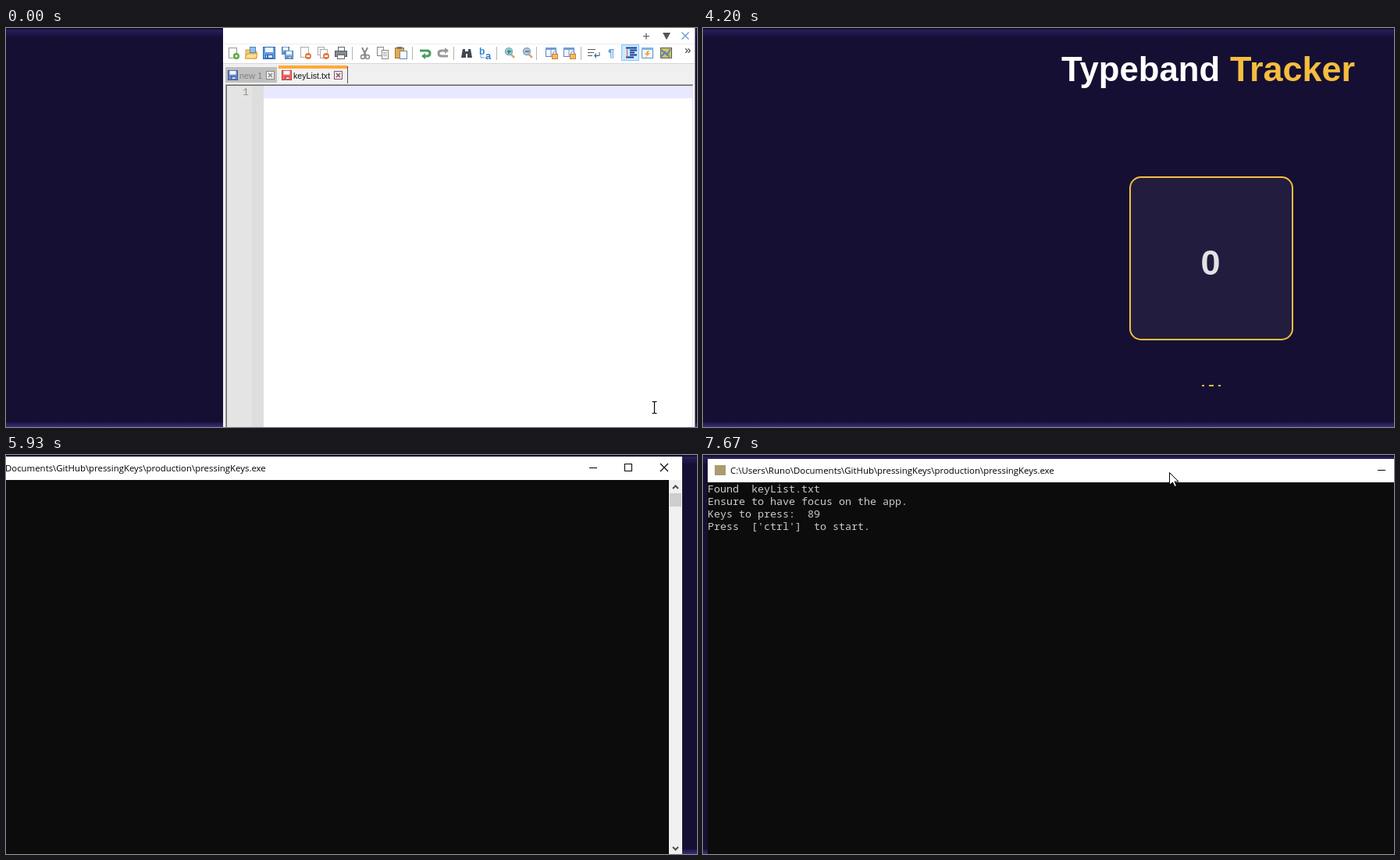
An HTML page with a canvas for the animation above (8 s loop, 885 by 511 pixels).

```html
<!DOCTYPE html>
<html lang="en">
<head>
<meta charset="utf-8">
<title>Key list demo</title>
<style>
  html, body { margin: 0; width: 100%; height: 100%; overflow: hidden; background: #141030; }
  canvas { display: block; }
</style>
</head>
<body>
<canvas id="stage" width="885" height="511"></canvas>
<script>
const W = 885, H = 511, LOOP = 8000;
const CONSOLE_W = 977, CONSOLE_H = 511;
const stage = document.getElementById('stage').getContext('2d');
const layer = new OffscreenCanvas(CONSOLE_W, CONSOLE_H).getContext('2d');
let ctx = stage;

const SANS = '"Liberation Sans", Arial, sans-serif';
const CODE = '13.33px "Liberation Mono", monospace';
const CONSOLE = '13.33px "Noto Sans Mono", monospace';
const TITLE = '11.42px "Open Sans", sans-serif';
const GOLD = '#f5bd3f';

const WORDS = { u: 'up', d: 'down', l: 'left', r: 'right' };
const LINES = ('uuu ull dld rdd ruu ull drr ull ddd rru ull dlu urd ddl ' +
  'uru ldr rur ddr uld lur ull drd lul drr uuu rdd lur uld').split(' ')
  .map((keys, i) => `${3 * i + 1}.` + [...keys].map(k => WORDS[k]).join(''));

const OUTPUT = ['Found  keyList.txt', 'Ensure to have focus on the app.',
  'Keys to press:  89', "Press  ['ctrl']  to start."];
const EXE = 'C:\\Users\\Runo\\Documents\\GitHub\\pressingKeys\\production\\pressingKeys.exe';

// Keyframes: [time, x, y]
const EDITOR_MOUSE = [[0, 830, 486], [400, 360, 97], [600, 360, 97], [800, 359, 85],
  [1800, 359, 85], [2000, 328, 62], [2200, 319, 38], [2470, 336, 33], [2670, 336, 33],
  [3000, 480, 34], [3400, 770, 4], [3470, 783, -20]];
const WINDOW_DRAG = [[6270, -111, 2], [6600, 10, 14], [6670, 11, 15], [6800, 11, 15],
  [7130, 0, 3], [7400, 6, 5]];
const DRAG_MOUSE = [[6270, 496, 20], [6600, 617, 32], [6670, 618, 33], [6800, 618, 33],
  [7130, 592, 20], [7400, 597, 22]];

function along(keys, t) {
  if (t <= keys[0][0]) return keys[0].slice(1);
  const next = keys.findIndex(k => k[0] > t);
  if (next < 0) return keys[keys.length - 1].slice(1);
  const [t0, x0, y0] = keys[next - 1], [t1, x1, y1] = keys[next];
  const p = (t - t0) / (t1 - t0), e = p * p * (3 - 2 * p);
  return [Math.round(x0 + (x1 - x0) * e), Math.round(y0 + (y1 - y0) * e)];
}

function box(x, y, w, h, fill, stroke) {
  if (fill) { ctx.fillStyle = fill; ctx.fillRect(x, y, w, h); }
  if (stroke) {
    ctx.strokeStyle = stroke; ctx.lineWidth = 1;
    ctx.strokeRect(x + .5, y + .5, w - 1, h - 1);
  }
}

function path(x, y, d, stroke, width = 1, fill) {
  const shape = new Path2D(d);
  ctx.save();
  ctx.translate(x, y);
  if (fill) { ctx.fillStyle = fill; ctx.fill(shape); }
  if (stroke) { ctx.strokeStyle = stroke; ctx.lineWidth = width; ctx.stroke(shape); }
  ctx.restore();
}

function dot(x, y, r, fill, stroke) {
  path(x, y, `M${-r} 0A${r} ${r} 0 1 1 ${r} 0A${r} ${r} 0 1 1 ${-r} 0Z`, stroke, 1.5, fill);
}

function text(s, x, y, font, fill, align = 'left') {
  ctx.font = font; ctx.fillStyle = fill; ctx.textAlign = align;
  ctx.fillText(s, x, y);
}

function fade(x, y, w, h, from, to) {
  const g = ctx.createLinearGradient(0, y, 0, y + h);
  g.addColorStop(0, from); g.addColorStop(1, to);
  box(x, y, w, h, g);
}

function floppy(x, y, size, main, dark) {
  const u = size / 16;
  box(x, y, size, size, main, dark);
  box(x + 3 * u, y + u, 10 * u, 6 * u, '#f2f6ff');
  box(x + 3 * u, y + 10 * u, 10 * u, 5 * u, '#dfe8f5', dark);
  box(x + 5 * u, y + 11 * u, 2 * u, 3 * u, dark);
}

function sheet(x, y, w = 10, h = 13, edge = '#999') {
  box(x, y, w, h, '#fbfbfb', edge);
}

function lens(x, color) {
  path(x, 24, 'M9 9L14 14', '#d2aa70', 2.5);
  dot(x + 7, 30, 4.5, '#9fd0ee', '#7eaacb');
  box(x + 5, 29, 5, 2, color);
}

function lockedWindow(x) {
  box(x, 25, 14, 12, '#f3f8ff', '#5b88bf');
  box(x, 25, 14, 3, '#6f9ed6');
  path(x, 24, 'M7 2V13M10 9V7Q12 4 14 7V9', '#7894b8');
  box(x + 8, 33, 8, 7, '#f6b766', '#cb8335');
}

function toolbar(saved, mouse) {
  [443, 520, 573, 628, 679, 736].forEach(x => box(x, 24, 1, 17, '#b4b4b4'));
  const over = mouse && mouse[1] > 20 && mouse[1] < 44;
  if (over) {
    const slot = Math.floor((mouse[0] - 280) / 23);
    if (slot < 7) box(280 + 23 * slot, 21, 23, 22, '#e5f3ff', '#b5dcfa');
  }
  sheet(285, 25, 11, 14);
  dot(295, 36, 4, '#55a942');
  path(295, 36, 'M-2 0H2M0 -2V2', '#fff');

  path(306, 24, 'M1 4H7L9 6H15V15H1Z', '#d39b3a', 1, '#f6cb69');
  box(312, 24, 8, 8, '#8ec2f0', '#4e86c0');
  path(306, 24, 'M0 15L3 9H16L14 15Z', '#d39b3a', 1, '#ffdf89');

  saved ? floppy(329, 24, 16, '#949494', '#707070') : floppy(329, 24, 16, '#5f9de0', '#306cb4');
  floppy(353, 24, 10, '#8bb5e5', '#4778b0');
  floppy(357, 29, 11, '#8bb5e5', '#4778b0');
  sheet(377, 24, 11, 14, '#aaa');
  sheet(399, 24, 9, 11, '#aaa');
  sheet(402, 27, 10, 12, '#aaa');
  [387, 410].forEach(x => {
    dot(x, 36, 4, '#e37a43');
    box(x - 2, 35, 4, 2, '#fff');
  });
  box(425, 24, 9, 7, '#f8fbff', '#666');
  box(421, 29, 16, 8, '#838b96', '#505964');
  box(424, 34, 10, 6, '#fff', '#666');

  path(451, 24, 'M5 1L10 11M12 1L7 11', '#8b8b8b', 2);
  dot(457, 37, 2.5, null, '#888');
  dot(463, 37, 2.5, null, '#888');
  sheet(475, 24, 9, 12, '#888');
  sheet(481, 28, 9, 12, '#888');
  path(481, 28, 'M2 3.5H7M2 5.5H7M2 7.5H7', '#aaa');
  box(498, 25, 12, 14, '#e7ab50', '#a97224');
  box(501, 24, 6, 3, '#777');
  sheet(504, 29, 10, 11, '#6587ad');

  path(529, 24, 'M1 5H10Q14 5 14 8.5T10 12H5', '#4d9b62', 3);
  path(529, 24, 'M8 8L3 12L8 16Z', null, 1, '#4d9b62');
  path(552, 24, 'M14 5H6Q2 5 2 8.5T6 12H14', '#999', 3);
  path(552, 24, 'M10 1L15 5L10 9Z', null, 1, '#999');

  path(582, 24, 'M3 3H6V6H10V3H13L15 14H9V9H7V14H1Z', null, 1, '#3f4852');
  text('b', 606, 34, `bold 12px ${SANS}`, '#3a83cf');
  text('a', 614, 40, `bold 13px ${SANS}`, '#2876bf');
  path(606, 24, 'M2 10V14H7', '#56a1dc');

  lens(637, '#3c9a45');
  box(643, 28, 2, 5, '#3c9a45');
  lens(660, '#d95446');
  lockedWindow(691);
  lockedWindow(714);

  path(745, 24, 'M0 3.5H10M0 7.5H8M0 11.5H6M9 11.5H15V7', '#4b5763');
  path(745, 24, 'M11 8L8 11.5L11 15Z', null, 1, '#3d79b4');
  text('¶', 771, 37, `bold 15px ${SANS}`, '#62a5df');
  box(788, 21, 23, 21, '#cce8ff', '#88c7f5');
  path(793, 24, 'M1 1.5H15M6 4.5H15M6 7.5H12M6 10.5H15M1 13.5H11', '#173a9a', 2);
  path(793, 24, 'M2.5 3V14', '#d5584c');
  box(814, 25, 15, 14, '#f0f7ff', '#5b8dc3');
  box(814, 25, 15, 3, '#80b2e5');
  path(814, 25, 'M8 4L4 9H7L5 13L11 7H8L10 4Z', null, 1, '#f1a528');
  box(838, 25, 15, 14, '#d9bd65', '#59634f');
  path(838, 25, 'M1 12L6 6L9 9L13 2M1 3L12 12', '#548ab2', 2);
  text('»', 869, 33, `15px ${SANS}`, '#333');
}

function tabs(saved) {
  box(281, 50, 66, 20, '#c0c0c0');
  floppy(284, 54, 13, '#6482c8', '#3d579e');
  text('new 1', 299, 65, `11px ${SANS}`, '#828282');
  box(349, 48, 88, 23, '#f2f2f2');
  box(349, 48, 88, 4, '#ffaa38');
  box(437, 49, 1, 22, '#555');
  saved ? floppy(353, 54, 13, '#74addf', '#4276ad') : floppy(353, 54, 13, '#ef6661', '#cb3639');
  text('keyList.txt', 368, 65, `10.6px ${SANS}`, '#111');
  [[333, '#888'], [420, '#8a536d']].forEach(([x, c]) => {
    box(x, 55, 11, 11, '#eee', c);
    path(x, 55, 'M3 3L8 8M8 3L3 8', c, 1.6);
  });
}

function chevron(x, y, up) {
  path(x, y, up ? 'M-3.5 2L0 -1.5L3.5 2' : 'M-3.5 -2L0 1.5L3.5 -2', '#505050', 2);
}

function editor(t, mouse) {
  const active = t >= 670, filled = t >= 1600, saved = t >= 2730;
  box(278, 0, 605, H, '#f0f0f0');
  box(278, 0, 604, 45, '#fff');
  box(278, 20, 604, 1, '#ededed');
  box(278, 45, 604, 1, '#d8d8d8');
  if (active) box(277, 0, 1, H, '#343045');
  box(882, 0, 1, H, active ? '#343045' : '#77758a');

  const ink = active ? '#000' : '#555';
  path(820, 10.5, 'M-4 0H4M0 -4V4', ink, 1.2);
  path(846, 10, 'M-5 -4H5L0 5Z', null, 1, ink);
  path(870, 10, 'M-4.5 -4.5L4.5 4.5M4.5 -4.5L-4.5 4.5', active ? '#1d65b5' : '#6495d0', 1.2);
  toolbar(saved, mouse);
  tabs(saved);

  // Sunken frame: dark on the top and left, light on the right
  box(281, 72, 600, 439, '#fff');
  box(281, 72, 599, 1, '#a0a0a0');
  box(281, 72, 1, 439, '#a0a0a0');
  box(282, 73, 597, 1, '#696969');
  box(282, 73, 1, 438, '#696969');
  box(879, 73, 1, 438, '#e3e3e3');
  box(283, 74, 32, 437, '#e4e4e4');
  box(315, 74, 15, 437, '#dedede');

  if (!filled) box(330, 74, 549, 16, '#e8e8ff');
  LINES.slice(0, filled ? LINES.length : 1).forEach((line, i) => {
    const y = 86 + 16 * i;
    text(i + 1, 311, y, CODE, '#a28e7d', 'right');
    if (filled) text(line, 330, y, CODE, '#111');
  });
  if (filled) {
    box(862, 74, 17, 437, '#f0f0f0');
    box(862, 91, 15, 357, '#cdcdcd');
    chevron(869.5, 83, true);
  } else if (t >= 800 && t < 1400) {
    box(330, 74, 1, 16, '#000');
  }
}

function backdrop() {
  box(0, 0, W, H, '#151033');
  box(0, 0, W, 2, '#120e2c');
  fade(0, 2, W, 10, '#25205f', '#151033');
  fade(0, 505, W, 6, '#1d1745', '#392d78');
}

function counterPage() {
  text('Typeband', 459, 68, `bold 43.7px ${SANS}`, '#fff');
  text('Tracker', 675, 68, `bold 45px ${SANS}`, GOLD);
  ctx.beginPath();
  ctx.roundRect(547, 191, 208, 208, 14);
  ctx.fillStyle = 'rgba(255,255,255,.055)';
  ctx.fill();
  ctx.strokeStyle = GOLD; ctx.lineWidth = 2;
  ctx.stroke();
  text('0', 650, 316, `bold 45px ${SANS}`, '#e2e2e6', 'center');
  [[639, 3], [648, 6], [660, 3]].forEach(([x, w]) => box(x, 457, w, 2, GOLD));
}

function consoleContent(t) {
  box(0, 0, CONSOLE_W, 30, '#fff');
  box(0, 30, 960, CONSOLE_H - 30, '#0c0c0c');
  box(960, 30, 17, CONSOLE_H - 30, '#f0f0f0');
  box(961, 47, 15, 17, '#cdcdcd');
  chevron(968.5, 39, true);
  chevron(968.5, 502, false);
  box(9, 8, 14, 13, '#a99b72');
  text(EXE, 29, 19, TITLE, '#000');
  path(863, 14.5, 'M-5 0H5', '#000');
  box(903, 9, 10, 10, null, '#000');
  path(954, 14, 'M-5 -5L5 5M5 -5L-5 5', '#000', 1.1);

  if (t >= 6270) OUTPUT.forEach((line, i) => text(line, 0, 43 + 16 * i, CONSOLE, '#ccc'));
  if (t >= 7140 && t < 7670) box(0, 106, 8, 4, '#ccc');
}

// The window is painted as one layer so that it fades in as a whole.
function consoleWindow(t) {
  ctx = layer;
  consoleContent(t);
  ctx = stage;

  const p = Math.min(1, (t - 5530) / 330), rest = (1 - p) ** 3;
  const scale = 1 - .037 * rest;
  const [left, top] = along(WINDOW_DRAG, t);
  const x = left + CONSOLE_W * (1 - scale) / 2;
  const y = top + CONSOLE_H * (1 - scale) / 2 - 1.5 * rest;
  ctx.globalAlpha = 1 - .69 * rest;
  ctx.drawImage(layer.canvas, x, y, CONSOLE_W * scale, CONSOLE_H * scale);
  ctx.globalAlpha = 1;
}

function arrow([x, y]) {
  path(x + .5, y + .5, 'M0 0V16L4 12.5L6.5 18L9 17L6.5 11.5H11.5Z', '#000', 1, '#fff');
}

function beam([x, y]) {
  path(x + .5, y, 'M-3 -7.5H-1L0 -6.5L1 -7.5H3M0 -7V7M-3 7.5H-1L0 6.5L1 7.5H3', '#000', 1.2);
}

function draw(t) {
  backdrop();
  if (t < 4200) {
    const mouse = t < 3600 ? along(EDITOR_MOUSE, t) : null;
    editor(t, mouse);
    if (mouse) (mouse[1] > 73 ? beam : arrow)(mouse);
    return;
  }
  counterPage();
  if (t >= 5530) consoleWindow(t);
  if (t >= 6270) arrow(along(DRAG_MOUSE, t));
}

// Motion advances 15 times a second, with times rounded to 10 ms.
function tick() {
  const step = Math.floor(((performance.now() % LOOP) + 5) * .015);
  draw(Math.round(step * 100 / 15) * 10);
  requestAnimationFrame(tick);
}
tick();
</script>
</body>
</html>
```
